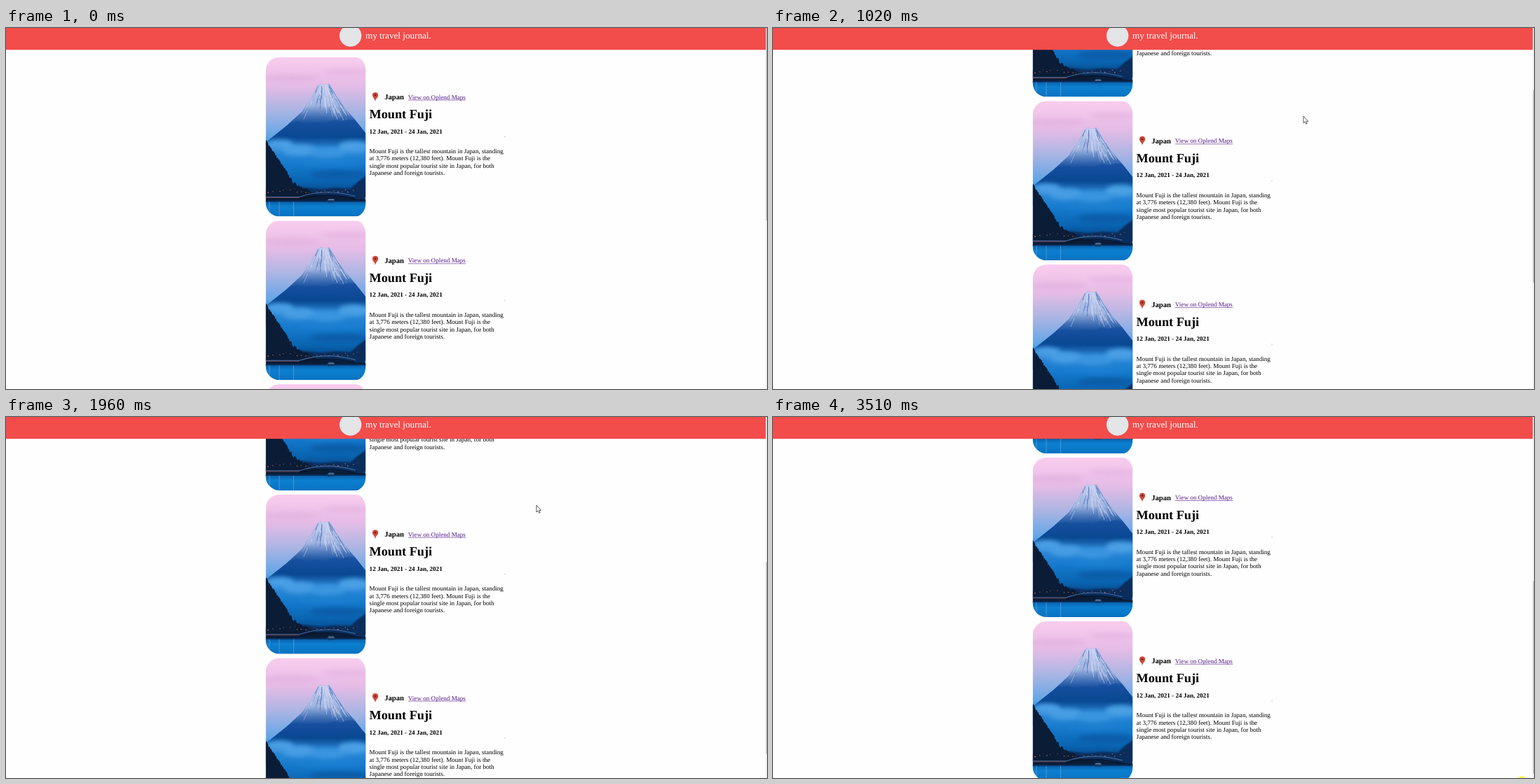
Write an HTML page that moves like this. It is 1086x516 px and loops after 3570 ms.

```html
<!DOCTYPE html>
<html lang="en">
<head>
<meta charset="utf-8">
<title>my travel journal</title>
<style>
  html, body { margin: 0; width: 100%; height: 100%; overflow: hidden; background: #fefefe; }
  svg { display: block; }
  text { font-family: "Liberation Serif", "Times New Roman", serif; font-size: 9.1px; text-rendering: geometricPrecision; }
  .bold { font-weight: bold; }
  .soft { filter: blur(3px); }
  .hazy { filter: blur(1px); }
</style>
</head>
<body>
<svg width="1086" height="516" viewBox="0 0 1086 516">
  <defs>
    <linearGradient id="sky" x2="0" y2="1">
      <stop offset="0" stop-color="#f9cdee"/>
      <stop offset=".32" stop-color="#e6bce6"/>
      <stop offset=".6" stop-color="#aeb5e3"/>
      <stop offset="1" stop-color="#4ea2e8"/>
    </linearGradient>
    <linearGradient id="slope" x2="0" y2="1">
      <stop offset="0" stop-color="#7f9fd6"/>
      <stop offset=".5" stop-color="#164f9e"/>
      <stop offset=".75" stop-color="#04458e"/>
      <stop offset="1" stop-color="#0a519f"/>
    </linearGradient>
    <linearGradient id="snow" x2="0" y2="1">
      <stop offset="0" stop-color="#c3c9ee"/>
      <stop offset=".55" stop-color="#a0b4e0"/>
      <stop offset="1" stop-color="#3f70b8" stop-opacity=".1"/>
    </linearGradient>
    <linearGradient id="mist" x2="0" y2="1">
      <stop offset="0" stop-color="#2f83d0" stop-opacity="0"/>
      <stop offset=".2" stop-color="#2f8bda"/>
      <stop offset=".48" stop-color="#1478cb"/>
      <stop offset=".75" stop-color="#0964b1"/>
      <stop offset="1" stop-color="#083b76"/>
    </linearGradient>
    <linearGradient id="lake" x2="0" y2="1">
      <stop offset="0" stop-color="#0a5ca6"/>
      <stop offset=".35" stop-color="#0b80cf"/>
      <stop offset="1" stop-color="#0872c2"/>
    </linearGradient>
    <clipPath id="frame">
      <path d="M20 0H128A15 20 0 0 1 143 20V208A15 20 0 0 1 128 228H20A20 20 0 0 1 0 208V20A20 20 0 0 1 20 0Z"/>
    </clipPath>
    <clipPath id="snowArea">
      <path d="M74 41L79 38 84 40 91 38 100 54 112 72 128 90 118 89 108 92 98 90 86 95 72 93 60 95 46 92 34 95 52 78 66 57Z"/>
    </clipPath>

    <g id="card">
      <g clip-path="url(#frame)">
        <rect width="143" height="124" fill="url(#sky)"/>
        <g class="soft" fill="#d99fd5" opacity=".35">
          <ellipse cx="35" cy="30" rx="42" ry="5"/>
          <ellipse cx="115" cy="21" rx="34" ry="4"/>
        </g>
        <path d="M0 122L30 98 52 78 66 57 74 41 79 38 84 40 91 38 100 54 112 72 128 90 143 109V150H0Z" fill="url(#slope)"/>
        <g clip-path="url(#snowArea)">
          <rect x="30" y="38" width="100" height="57" fill="url(#snow)"/>
          <g id="ridges"/>
        </g>
        <rect y="114" width="143" height="86" fill="url(#mist)"/>
        <g class="soft">
          <ellipse cx="20" cy="125" rx="20" ry="7" fill="#4a9fe4"/>
          <ellipse cx="48" cy="133" rx="24" ry="8" fill="#479de2"/>
          <ellipse cx="88" cy="137" rx="26" ry="7" fill="#3b95df"/>
          <ellipse cx="126" cy="128" rx="22" ry="8" fill="#4a9fe4"/>
          <ellipse cx="92" cy="150" rx="46" ry="5" fill="#1c80d0"/>
          <ellipse cx="105" cy="168" rx="42" ry="6" fill="#0b5ca7"/>
        </g>
        <path class="hazy" d="M0 190L50 186 78 189 100 187 121 188 132 178 143 170V210H0Z" fill="#0a2d5c"/>
        <path id="hill" fill="#0b1c36"/>
        <rect y="206" width="143" height="22" fill="url(#lake)"/>
        <path d="M0 206H143" stroke="#0a2c58" stroke-width="2"/>
        <g fill="none">
          <path d="M0 200H48Q85 187 128 199" stroke="#42699c" stroke-width="1.2"/>
          <path d="M48 203Q85 193 128 203" stroke="#07162d" stroke-width="1.8"/>
          <path d="M0 201H48" stroke="#87474f" stroke-width=".8"/>
          <path d="M5.5 207V228M19.5 207V228M40 207V228" stroke="#799bd5" stroke-width=".7"/>
        </g>
        <g id="lamps"/>
        <path d="M87 205H99L97 208H89ZM90 202H97V205H90Z" fill="#163c68"/>
        <path d="M89 204H98" stroke="#a6bddd" stroke-width=".7"/>
      </g>

      <path d="M156.5 64C156 59 152.4 58 152.4 54.6A4.1 4.1 0 0 1 160.6 54.6C160.6 58 157 59 156.5 64Z" fill="#cf4838"/>
      <circle cx="156.5" cy="54.5" r="1.4" fill="#6c211d"/>
      <text class="bold" x="169.7" y="60.5" style="font-size:10.6px">Japan</text>
      <text x="203.3" y="60.2" fill="#551a8b">View on Oplend Maps</text>
      <path d="M203.3 61.5H285.6" stroke="#551a8b" stroke-width=".6"/>
      <text class="bold" x="148.1" y="87.5" style="font-size:18.2px">Mount Fuji</text>
      <text class="bold" x="148.1" y="109">12 Jan, 2021 - 24 Jan, 2021</text>
      <path d="M340.5 114H342.5" stroke="#bbb" stroke-width=".8"/>
      <text y="137.6">
        <tspan x="148.1">Mount Fuji is the tallest mountain in Japan, standing</tspan>
        <tspan x="148.1" dy="10.35">at 3,776 meters (12,380 feet). Mount Fuji is the</tspan>
        <tspan x="148.1" dy="10.35">single most popular tourist site in Japan, for both</tspan>
        <tspan x="148.1" dy="10.35">Japanese and foreign tourists.</tspan>
      </text>
    </g>
  </defs>

  <rect width="1086" height="516" fill="#fefefe"/>
  <g id="page">
    <use href="#card" x="370.5" y="41.5"/>
    <use href="#card" x="370.5" y="275.3"/>
    <use href="#card" x="370.5" y="509.1"/>
    <use href="#card" x="370.5" y="742.9"/>
  </g>
  <rect x="1084" width="2" height="516" fill="#f1f1f1"/>
  <rect id="thumb" x="1084.6" width="1.4" height="275" fill="#bdbdbd"/>
  <rect width="1084.3" height="31.2" fill="#f24c4b"/>
  <circle cx="491.6" cy="11" r="15.7" fill="#e4e5e7"/>
  <text x="513" y="15" fill="#fff" style="font-size:13.15px">my travel journal.</text>
  <circle id="click" cx="1068.5" cy="520" r="6.8" fill="#f8f84a"/>
  <path id="cursor" d="M0 0V10L2.3 8 3.8 11.2 5.3 10.5 3.9 7.4H6.7Z" fill="#fff" stroke="#333" stroke-width=".8"/>
</svg>
<script>
const $ = id => document.getElementById(id);
const LOOP = 3570, TICK = 70;

// Seeded noise for the scenery
let seed = 7;
const random = () => (seed = seed * 16807 % 2147483647) / 2147483647;
const between = (low, high) => low + (high - low) * random();

function add(parent, tag, attributes) {
  const node = document.createElementNS("http://www.w3.org/2000/svg", tag);
  for (const name in attributes) node.setAttribute(name, attributes[name]);
  parent.append(node);
}

function drawScenery() {
  for (let i = 0; i < 85; i++) {
    const spread = between(-1, 1), top = between(0, .7), end = top + between(.12, .32);
    const point = depth => `${82 + spread * (8 + 40 * depth)} ${38 + 56 * depth}`;
    add($("ridges"), "path", {
      d: `M${point(top)}L${point(end)}`,
      stroke: i % 3 ? "#d5dbf4" : "#4d78bb",
      "stroke-width": between(.5, 1.2),
      opacity: .85 - .5 * top
    });
  }
  let hill = "M0 119";
  for (let x = 1; x <= 62; x++) {
    const ridge = x < 40 ? 120 + x * 1.55 : 182 + (x - 40) * .5;
    hill += `L${x} ${ridge - between(0, 4)}`;
  }
  $("hill").setAttribute("d", hill + "L75 198 143 204V207H0Z");
  for (let i = 0; i < 24; i++) {
    add($("lamps"), "circle", {
      cx: 3 + i * 5.5 + between(-2, 2),
      cy: between(188, 194),
      r: between(.4, .9),
      fill: i % 3 ? "#a65a43" : "#ef8252"
    });
  }
}

// Bursts of movement: [first tick, number of ticks]
const bursts = [[0, 1], [120, 8], [880, 3], [1420, 3], [1890, 4], [2550, 8], [3110, 3]];

function heldTime(time) {
  const [start, count] = bursts.findLast(([first]) => first <= time);
  return start + Math.min(Math.floor((time - start) / TICK), count - 1) * TICK;
}

// Wheel turns: [start, duration, distance]
const wheel = [[856, 164, 171], [1396, 164, 171], [1866, 184, 109.1]];

function ease(value) {
  const p = Math.max(0, Math.min(1, value));
  return p * p * (3 - 2 * p);
}

const scrollAt = time => wheel.reduce(
  (sum, [start, duration, distance]) => sum + distance * ease((time - start) / duration), 0);

const exitPath = [
  [2500, 757, 126], [2550, 772, 150], [2620, 835, 262], [2690, 915, 398],
  [2760, 965, 466], [2830, 985, 488], [3040, 1008, 497], [3110, 1026, 503], [3180, 1046, 511]
];

function cursorAt(time) {
  if (time < 2500) {
    const p = ease((time - 120) / 490);
    return [1027 - 270 * p, 497 - 371 * p];
  }
  const next = exitPath.findIndex(([at]) => at >= time);
  const [t0, x0, y0] = exitPath[next - 1], [t1, x1, y1] = exitPath[next];
  const p = (time - t0) / (t1 - t0);
  return [x0 + (x1 - x0) * p, y0 + (y1 - y0) * p];
}

let drawn = -1;
function render(now) {
  const time = now % LOOP, held = heldTime(time);
  $("click").style.display = time >= 3510 ? "" : "none";
  if (held !== drawn) {
    drawn = held;
    const scroll = scrollAt(held), visible = held >= 120 && held <= 3180;
    $("page").setAttribute("transform", `translate(0 ${-scroll})`);
    $("thumb").setAttribute("y", scroll * .52);
    $("cursor").style.display = visible ? "" : "none";
    if (visible) $("cursor").setAttribute("transform", `translate(${cursorAt(held)})`);
  }
  requestAnimationFrame(render);
}

drawScenery();
render(0);
</script>
</body>
</html>
```
